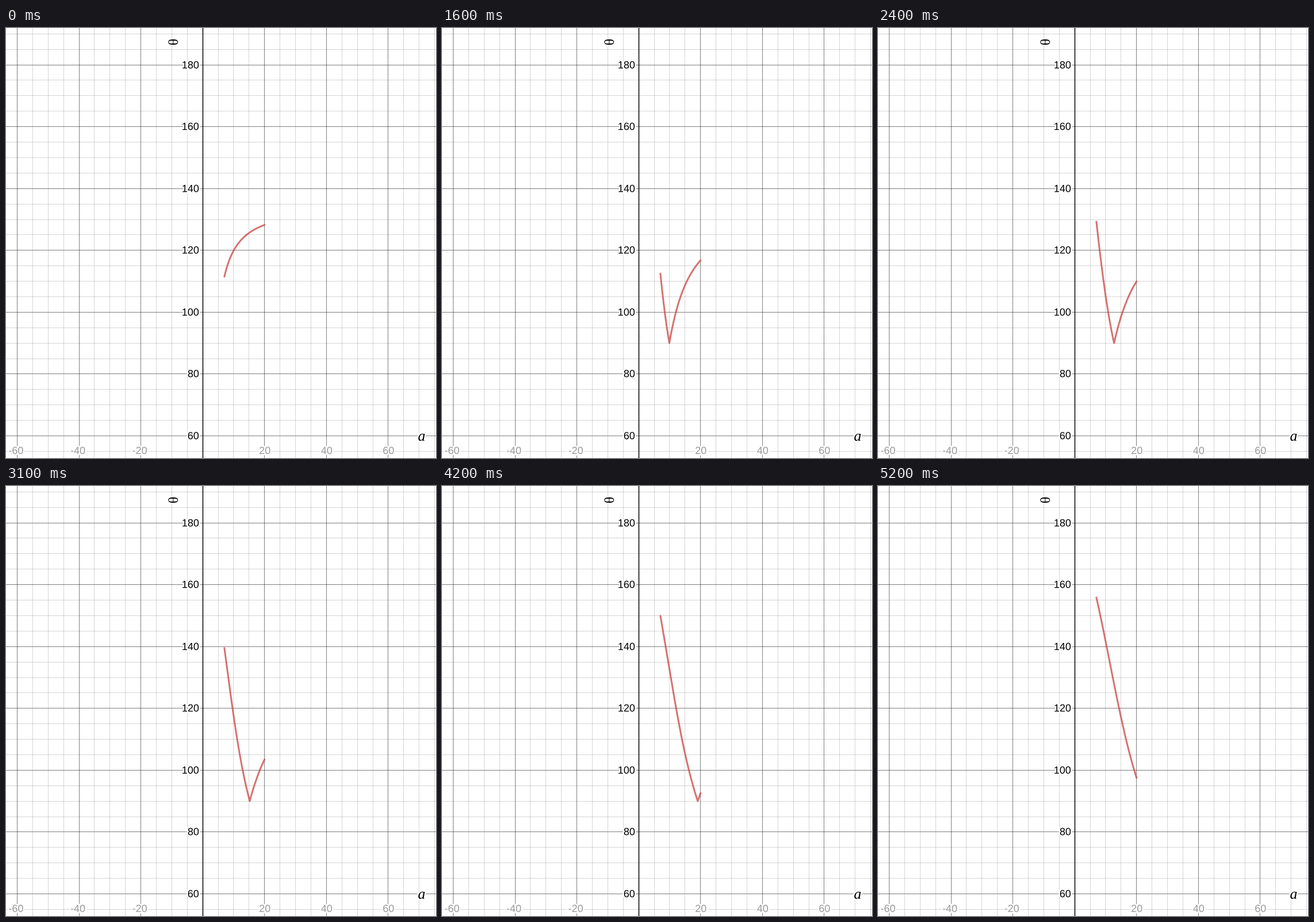
Write a matplotlib script that moves like this. It is 748 px wide and 748 px high and loops after 5300 ms.

```python
import numpy as np
import matplotlib.pyplot as plt
from matplotlib.animation import FuncAnimation
from matplotlib.patheffects import withStroke

SIZE = 748
DPI = 100
PX = 72 / DPI            # one pixel in points
SCALE = 5.379            # pixels per unit
X0, Y180 = 342.2, 64.05  # pixel places of a = 0 and theta = 180

FRAMES = 53
INTERVAL = 100


def px(a):
    return X0 + a * SCALE


def py(theta):
    return Y180 + (180 - theta) * SCALE


def centre(p):
    """Middle of the pixel that holds p."""
    return np.floor(p) + 0.5


fig = plt.figure(figsize=(SIZE / DPI, SIZE / DPI), dpi=DPI, facecolor="white")
ax = fig.add_axes([0, 0, 1, 1])
ax.set_xlim(0, SIZE)
ax.set_ylim(SIZE, 0)
ax.axis("off")


def rule(xs, ys, width=1, alpha=1, zorder=1):
    # Snapping would push lines at pixel centres to a neighbouring pixel.
    ax.plot(xs, ys, color="black", lw=width * PX, alpha=alpha,
            zorder=zorder, snap=False)


def grid_style(value):
    major = value % 20 == 0
    return dict(alpha=0.5 if major else 0.16, zorder=2 if major else 1)


def draw_grid():
    for a in range(-60, 80, 5):
        if a:
            x = centre(px(a))
            rule([x, x], [0, SIZE], **grid_style(a))
    for theta in range(55, 195, 5):
        y = centre(py(theta))
        rule([0, SIZE], [y, y], **grid_style(theta))
    x = centre(X0)
    rule([x, x], [0, SIZE], width=1.5, zorder=3)


def label(x, y, text, size=18, color="black", family="Liberation Sans", **kw):
    halo = [withStroke(linewidth=5 * PX, foreground="white")]
    ax.text(x, y, text, fontsize=size * PX, color=color, family=family,
            va="baseline", path_effects=halo, zorder=4, **kw)


def draw_labels():
    for theta in range(60, 200, 20):
        label(336, centre(py(theta)) + 5.8, str(theta), ha="right")
    for a in range(-60, 80, 20):
        if a:
            shift = -2 if a < 0 else 0.5
            label(px(a) + shift, 741, str(a), color="#999999", ha="center")
    label(299, 24.5, "θ", size=24, family="Liberation Serif", ha="center",
          rotation=90, rotation_mode="anchor")
    label(723, 718, "a", size=26, family="Liberation Serif", ha="center",
          style="italic")


draw_grid()
draw_labels()
curve, = ax.plot([], [], color="#c74440", alpha=0.75, lw=3 * PX, zorder=5,
                 solid_capstyle="round", solid_joinstyle="round")


def update(i):
    b = np.sqrt(2) * (3 + i / 4)
    a = np.linspace(7, 20, 300)
    if 7 < b < 20:
        a = np.sort(np.append(a, b))  # keep the corner sharp
    theta = 90 + np.degrees(np.arctan(np.abs(1 - b / a)))
    curve.set_data(px(a), py(theta))
    return curve,


anim = FuncAnimation(fig, update, frames=FRAMES, interval=INTERVAL,
                     repeat=True, repeat_delay=0)
plt.show()
```
